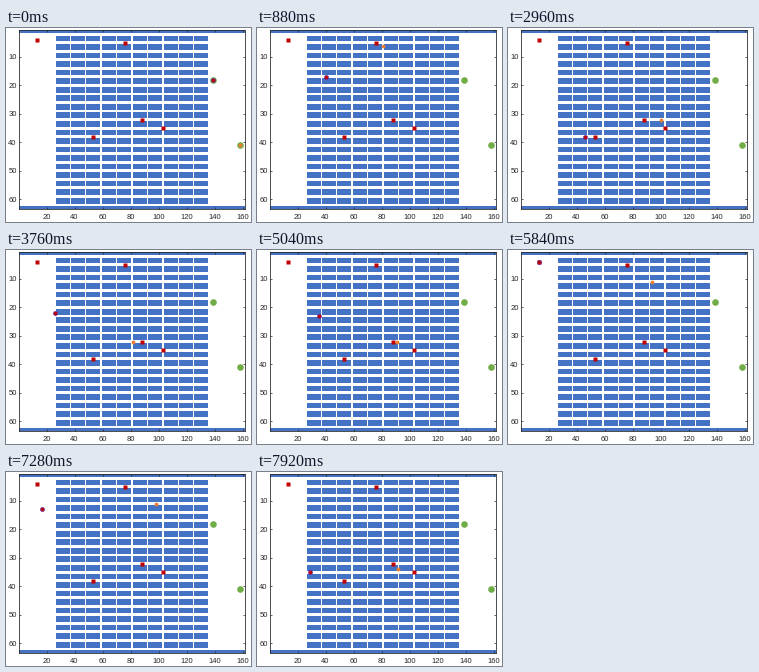
A matplotlib script that plays this animation: 245 px wide and 194 px high, repeating every 8000 ms.

```python
import matplotlib.pyplot as plt
from matplotlib.animation import FuncAnimation
from matplotlib.patches import Rectangle

W, H, DPI = 245, 194, 100
FRAMES, INTERVAL = 100, 80
COLS, ROWS = 161, 63
SPEED = 9  # cells per frame
BLUE, GREEN, RED = "#4472C4", "#70AD47", "#C00000"
PURPLE, ORANGE, INK = "#7030A0", "#ED7D31", "#262626"
PX = 72 / DPI  # points per pixel

# Axes box in pixels
LEFT, RIGHT, TOP, BOTTOM = 13.2, 238.8, 1.9, 181.2

plt.rcParams["font.family"] = "Liberation Sans"
fig = plt.figure(figsize=(W / DPI, H / DPI), dpi=DPI, facecolor="white")
ax = fig.add_axes([LEFT / W, 1 - BOTTOM / H, (RIGHT - LEFT) / W, (BOTTOM - TOP) / H])
ax.set_xlim(0.5, COLS + 0.5)
ax.set_ylim(ROWS + 0.5, 0.5)
ax.set_xticks(range(20, COLS, 20))
ax.set_yticks(range(10, ROWS, 10))
ax.tick_params(direction="in", length=2 * PX, width=0.7 * PX, labelsize=7.6 * PX,
               top=True, right=True, colors=INK)
ax.tick_params(axis="x", pad=4.5 * PX)
ax.tick_params(axis="y", pad=2.5 * PX)
for spine in ax.spines.values():
    spine.set(linewidth=0.8 * PX, color=INK)


def block(x, y, w, h):
    """Fill w by h cells whose first cell is (x, y)."""
    ax.add_patch(Rectangle((x - 0.5, y - 0.5), w, h, color=BLUE, linewidth=0))


for wall_row in (1, ROWS):
    block(1, wall_row, COLS, 1)
for y in range(3, ROWS - 2, 3):
    for x in range(27, 136, 11):
        block(x, y, 10, 2)


def dots(points, marker, size, color, edge="none", z=3):
    xs, ys = zip(*points)
    return ax.plot(xs, ys, linestyle="none", marker=marker, markersize=size * PX,
                   markerfacecolor=color, markeredgecolor=edge,
                   markeredgewidth=0.7 * PX, zorder=z, clip_on=False)[0]


A, B = (13, 4), (53, 38)
STOPS = {"C": (76, 5), "D": (88, 32), "E": (103, 35)}
GATE_A, GATE_B = (139, 18), (158, 41)

dots([GATE_A, GATE_B], "o", 6.6, GREEN)
dots([A, B, *STOPS.values()], "s", 4.2, RED, z=4)
left_agent = dots([GATE_A], "o", 4, RED, PURPLE, z=5)
right_agent = dots([GATE_B], "o", 3.8, ORANGE, z=5)


def distance(p, q):
    return max(abs(q[0] - p[0]), abs(q[1] - p[1]))


def toward(p, q, steps):
    t = steps / distance(p, q)
    return p[0] + t * (q[0] - p[0]), p[1] + t * (q[1] - p[1])


def route(*corners):
    """Cut each corner diagonally: one cell in aisles, up to the racks outside."""
    path = [corners[0]]
    for before, corner, after in zip(corners, corners[1:], corners[2:]):
        cut = max(1, 27 - corner[0], corner[0] - 136)
        cut = min(cut, distance(before, corner), distance(corner, after))
        path += [toward(corner, before, cut), toward(corner, after, cut)]
    return path + [corners[-1]]


def length(path):
    return sum(distance(p, q) for p, q in zip(path, path[1:]))


def walk(path, steps):
    for p, q in zip(path, path[1:]):
        gap = distance(p, q)
        if steps < gap:
            return toward(p, q, steps)
        steps -= gap
    return path[-1]


# Left agent: enters, then shuttles between A and the cell beside B
BESIDE_B = (B[0] - 1, B[1])
ENTRY_A = route(GATE_A, (139, 17), (13, 17), A)
SHUTTLE = (route(A, (13, 23), (37, 23), (37, 38), BESIDE_B)
           + route(BESIDE_B, (37, 38), (37, 35), (13, 35), A))
SHUTTLE_FRAMES, SHUTTLE_START = 15, 15

# Right agent: visits the stops in plan order, each "." is a short pause
PLAN = "CD.C.EDCD.ECDEC" + "." * 9 + "DECEDE...DC...EDED"
PAUSE = 3
ENTRY_B = route(GATE_B, (158, 17), (92, 17), (92, 5), STOPS["C"])
VIA = {"CD": [(81, 5), (81, 32)], "CE": [(92, 5), (92, 11), (103, 11)],
       "DE": [(103, 32)], "ED": [(92, 35), (92, 32)]}
for leg in ("CD", "CE"):
    VIA[leg[::-1]] = VIA[leg][::-1]


def schedule(plan):
    """List of (first step, path) for every leg of the plan."""
    trips, clock, here = [(0, ENTRY_B)], length(ENTRY_B), plan[0]
    for stop in plan[1:]:
        if stop == ".":
            clock += PAUSE
            continue
        path = route(STOPS[here], *VIA[here + stop], STOPS[stop])
        trips.append((clock, path))
        clock, here = clock + length(path), stop
    return trips


TRIPS = schedule(PLAN)


def left_position(frame):
    if frame < SHUTTLE_START:
        return walk(ENTRY_A, SPEED * frame)
    return walk(SHUTTLE, SPEED * ((frame - SHUTTLE_START) % SHUTTLE_FRAMES))


def right_position(frame):
    steps = SPEED * frame
    start, path = [trip for trip in TRIPS if trip[0] <= steps][-1]
    return walk(path, steps - start)


def update(frame):
    for agent, (x, y) in ((left_agent, left_position(frame)),
                          (right_agent, right_position(frame))):
        agent.set_data([x], [y])
    return left_agent, right_agent


anim = FuncAnimation(fig, update, frames=FRAMES, interval=INTERVAL,
                     repeat=True, repeat_delay=0, blit=False)
plt.show()
```
